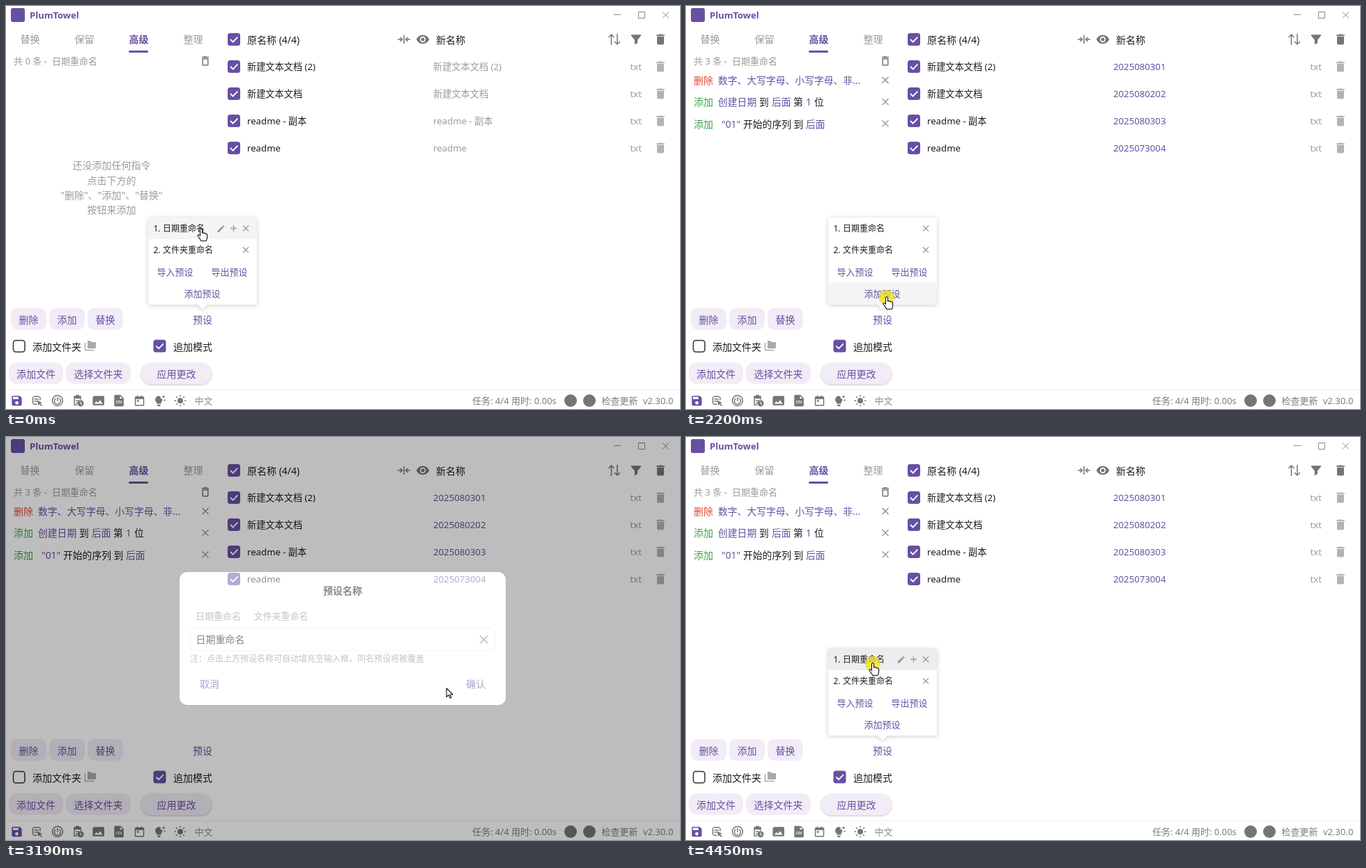
An HTML page that plays this animation: 967 by 579 pixels, repeating every 4.94 s.

```html
<!DOCTYPE html>
<html lang="zh-CN">
<head>
<meta charset="utf-8">
<title>PlumTowel</title>
<style>
html, body { margin: 0; width: 100%; height: 100%; overflow: hidden; background: #fff; }
svg { display: block; width: 967px; height: 579px; }
text { font-family: "Noto Sans", "Noto Sans CJK SC", "Noto Sans CJK", sans-serif; white-space: pre; }
#panelBox { filter: drop-shadow(0 1px 3px rgba(0,0,0,.2)); }
#apply { filter: drop-shadow(0 1px 1px rgba(0,0,0,.22)); }
</style>
</head>
<body>
<svg id="stage" viewBox="0 0 967 579"></svg>
<script>
const LOOP = 4940;
const PURPLE = '#6750a4', GRAY = '#9b9b9b', DARK = '#1d1b20', ICON = '#757575';

// Markup helpers; y is the optical centre of the text line.
const text = (x, y, size, fill, str, extra = '') =>
  `<text x="${x}" y="${(y + size * .37).toFixed(2)}" font-size="${size}" fill="${fill}" ${extra}>${str}</text>`;
const mid = 'text-anchor="middle"';
const rect = (x, y, w, h, r, fill, extra = '') =>
  `<rect x="${x}" y="${y}" width="${w}" height="${h}" rx="${r}" fill="${fill}" ${extra}/>`;
const line = (d, color, w = 1.2) =>
  `<path d="${d}" fill="none" stroke="${color}" stroke-width="${w}"/>`;
const icon = (x, y, size, d, fill = ICON) =>
  `<path transform="translate(${x - size / 2} ${y - size / 2}) scale(${size / 24})" d="${d}" fill="${fill}" fill-rule="evenodd"/>`;
const cross = (x, y, r, color = '#858585', w = 1.1) =>
  line(`M${x - r} ${y - r}l${2 * r} ${2 * r}m0 ${-2 * r}l${-2 * r} ${2 * r}`, color, w);
const check = (x, y) =>
  rect(x - 9, y - 9, 18, 18, 3.5, PURPLE) + line(`M${x - 5} ${y}l3.6 3.6 6.8-7`, '#fff', 1.8);
const group = (id, body) => `<g id="${id}">${body}</g>`;
const button = (x, y, w, r, str, id = '') =>
  rect(x, y, w, 31, r, '#f2ecf6', id && `id="${id}"`) + text(x + w / 2, y + 16.5, 14, PURPLE, str, mid);

const BIN = 'M6 19a2 2 0 0 0 2 2h8a2 2 0 0 0 2-2V7H6zM19 4h-3.5l-1-1h-5l-1 1H5v2h14z';
const EYE = 'M12 4.5C7 4.5 2.7 7.6 1 12c1.7 4.4 6 7.5 11 7.5s9.3-3.1 11-7.5c-1.7-4.4-6-7.5-11-7.5zM12 17a5 5 0 1 1 0-10 5 5 0 0 1 0 10zm0-8a3 3 0 1 0 0 6 3 3 0 0 0 0-6z';
const SAVE = 'M17 3H5a2 2 0 0 0-2 2v14a2 2 0 0 0 2 2h14a2 2 0 0 0 2-2V7zM12 19a3 3 0 1 1 0-6 3 3 0 0 1 0 6zM15 9H5V5h10z';
const LIST = 'M3 3h16v2H3zM3 3h2v17H3zM17 3h2v8h-2zM7 8h8v2H7zM7 12h5v2H7zM3 18h9v2H3zM12 11l10 5-4 1 4 4-1.5 1.5-4-4-1.5 3.5z';
const POWER = 'M12 1a11 11 0 1 0 0 22 11 11 0 0 0 0-22zM12 3a9 9 0 1 1 0 18 9 9 0 0 1 0-18zM11 5h2v8h-2zM8 7l1.3 1.5a5 5 0 1 0 5.4 0L16 7a7 7 0 1 1-8 0z';
const CLIP = 'M4 3h4V1h6v2h4v7h-2V8H6v11h5v2H4zM8 11h6v2H8zM8 15h3v2H8zM17 11a6 6 0 1 0 0 12 6 6 0 0 0 0-12zM16.3 13.5h1.4v3.3l2.3 1.5-.8 1.2-2.9-2z';
const IMAGE = 'M4 3h17a2 2 0 0 1 2 2v14a2 2 0 0 1-2 2H3a2 2 0 0 1-2-2V5zM4 18h16l-5-7-4 5-3-3z';
const FILE = 'M6 1h9l6 6v14a2 2 0 0 1-2 2H5a2 2 0 0 1-2-2V3a2 2 0 0 1 3-2zM14 3v5h5z';
const CAL = 'M5 4h2V2h2v2h6V2h2v2h2a2 2 0 0 1 2 2v14a2 2 0 0 1-2 2H5a2 2 0 0 1-2-2V6a2 2 0 0 1 2-2zM5 9v11h14V9zM7 11h4v3H7z';
const BULB = 'M10 3a7 7 0 0 0-4 12.700V18h8v-2.300A7 7 0 0 0 16 8h-3V4zM7 19.500h6V21a1.500 1.500 0 0 1-1.500 1.500h-3A1.500 1.500 0 0 1 7 21zM19 1l1 2.500 2.500 1-2.500 1-1 2.500-1-2.500-2.500-1 2.500-1zM21 9l.7 1.500 1.500.7-1.500.7-.7 1.500-.7-1.500-1.500-.7 1.500-.7z';
const PENCIL = 'M3 17.200V21h3.800L18 9.900 14.100 6zM20.700 7a1 1 0 0 0 0-1.400l-2.300-2.300a1 1 0 0 0-1.400 0L15.100 5.100 18.900 8.900z';

const files = ['新建文本文档 (2)', '新建文本文档', 'readme - 副本', 'readme'];
const dates = ['2025080301', '2025080202', '2025080303', '2025073004'];
const rowY = i => 87 + 39 * i;
const names = (id, list, color) =>
  group(id, list.map((s, i) => text(613, rowY(i), 13.2, color, s)).join(''));

function titleBar() {
  return rect(7, 3, 20, 20, 3, PURPLE) +
    text(34, 13, 13, PURPLE, 'PlumTowel', 'font-weight="700"') +
    line('M872 12.500h10M907.500 8.500h9v9h-9z', '#8a8a8a', 1) + cross(946.5, 13, 4.5, '#8a8a8a', 1);
}

function tabs() {
  return ['替换', '保留', '高级', '整理'].map((s, i) =>
    text(20.5 + 78 * i, 47.5, 14, i == 2 ? PURPLE : GRAY, s, i == 2 ? 'font-weight="700"' : '')).join('') +
    rect(176, 64, 28, 3, 1.5, PURPLE) +
    text(11, 79, 13, GRAY, '', 'id="count"') + text(66, 79, 13, GRAY, '日期重命名') +
    icon(286, 79, 18, BIN + 'M8 9h8v10H8z');
}

function emptyHint() {
  return group('empty', ['还没添加任何指令', '点击下方的', '"删除"、"添加"、"替换"', '按钮来添加']
    .map((s, i) => text(151.5, 229 + 21.4 * i, 14, GRAY, s, mid)).join(''));
}

function rules() {
  // Each part: x, text, optional dark flag.
  const parts = [
    [[46, '数字、大写字母、小写字母、非...']],
    [[46, '创建日期'], [105, '到', 1], [123, '后面'], [154, '第', 1], [172, '1'], [184, '位', 1]],
    [[51, '"01"'], [82, '开始的序列', 1], [154.500, '到', 1], [172, '后面']],
    [[47, '" - New！！！ "'], [147, '到', 1], [165, '后面'], [196, '第', 1], [214, '1'], [226, '位', 1]]
  ];
  return parts.map((row, i) => {
    const y = 107 + 31.2 * i;
    return group('rule' + i,
      text(11, y, 14, i ? '#3fa34d' : '#e5483b', i ? '添加' : '删除') +
      row.map(([x, s, dark]) => text(x, y, 13.8, dark ? DARK : PURPLE, s)).join('') +
      cross(286, y - .5, 4.5));
  }).join('');
}

function fileList() {
  let s = check(327, 48) + text(346, 48.5, 14, DARK, '原名称 (4/4)') + text(617, 48.5, 14, DARK, '新名称') +
    line('M562 48h6m-2.500-3l3 3-3 3M580 48h-6m2.500-3l-3 3 3 3M571 42v12', ICON, 1.5) +
    icon(598, 48, 20, EYE) +
    line('M868.500 56V41m-4 4l4-4 4 4M877 40v15m-4-4l4 4 4-4', ICON, 1.5) +
    icon(904, 48, 20, 'M3.500 4h17v1.500L14.500 13v5l-5 3v-8l-6-7.500z') + icon(939, 48, 20, BIN);
  files.forEach((f, i) => {
    const y = rowY(i);
    s += check(327, y) + text(346, y, 13.2, DARK, f) +
      text(895.5, y + .5, 13.2, GRAY, 'txt') + icon(939, y, 20, BIN, '#b3b3b3');
  });
  return s + names('plain', files, GRAY) + names('dated', dates, PURPLE) +
    names('suffixed', dates.map(d => d + ' - New！！！'), PURPLE);
}

function controls() {
  return button(7, 434, 51, 9, '删除') + button(62, 434, 51, 9, '添加') + button(117, 434, 51, 9, '替换') +
    text(268, 451, 14, PURPLE, '预设') +
    rect(10.5, 480.5, 16.5, 16.5, 3.5, 'none', 'stroke="#333" stroke-width="1.500"') +
    text(38, 490, 14, DARK, '添加文件夹') +
    `<path d="M117 481h4.500l1.500 2h6v9h-12z" fill="#aaa"/>` + line('M113.500 484v10.500h13', '#aaa', 1.5) +
    check(220.5, 488.5) + text(240, 490, 14, DARK, '追加模式') +
    button(4, 512, 78, 12, '添加文件') + button(86, 512, 93, 12, '选择文件夹') + button(193.5, 512.5, 102, 15.5, '应用更改', 'apply');
}

function footer() {
  let rays = '';
  for (let i = 0; i < 8; i++) {
    const c = Math.cos(i * Math.PI / 4), s = Math.sin(i * Math.PI / 4);
    rays += `M${250 + 6 * c} ${567 + 6 * s}L${250 + 8.3 * c} ${567 + 8.3 * s}`;
  }
  return line('M0 551.500H967', '#eeeeee', 1) + icon(15.5, 567, 19, SAVE, PURPLE) +
    [LIST, POWER, CLIP, IMAGE, FILE, CAL, BULB].map((d, i) => icon(44.5 + 29.4 * i, 567, 18, d)).join('') +
    text(162, 569.5, 5, '#fff', 'CSV', mid + ' font-weight="700"') +
    `<circle cx="250" cy="567" r="4" fill="${ICON}"/>` + line(rays, ICON, 1.5) +
    text(270.5, 567, 13, '#8a8a8a', '中文') + text(669, 567, 13, '#7d7d7d', '任务: 4/4 用时: 0.00s') +
    `<circle cx="810" cy="567" r="9" fill="${ICON}"/><circle cx="837" cy="567" r="9" fill="${ICON}"/>` +
    text(854.5, 567, 13, '#7d7d7d', '检查更新') + text(914, 567, 13, '#7d7d7d', 'v2.30.0');
}

function panel() {
  return group('panel',
    '<path id="panelBox" d="M208 304H356a4 4 0 0 1 4 4V425a4 4 0 0 1-4 4H289l-7 7-7-7H208a4 4 0 0 1-4-4V308a4 4 0 0 1 4-4z" fill="#fff"/>' +
    rect(204, 304, 156, 31, 3, '#f4f4f4', 'id="hover"') +
    text(211.5, 319.5, 12, DARK, '1.') + text(225, 319.5, 12, DARK, '日期重命名') +
    text(211.5, 350.5, 12, DARK, '2.') + text(225, 350.5, 12, DARK, '文件夹重命名') +
    group('tools', icon(308.5, 320, 13, PENCIL, '#999') + line('M322 319.500h9m-4.500-4.500v9', '#999', 1.3)) +
    cross(344, 319.5, 4, '#999', 1.2) + cross(344, 350.5, 4, '#999', 1.2) +
    text(216.5, 382, 13, PURPLE, '导入预设') + text(294.5, 382, 13, PURPLE, '导出预设') +
    text(281.5, 413, 13, PURPLE, '添加预设', mid));
}

function dialog() {
  return group('modal', '<path d="M0 0H967V579H0z" fill="#000" opacity=".5"/>' +
    rect(249, 194, 468, 191, 11, '#fff') +
    text(483, 221, 14, DARK, '预设名称', mid + ' font-weight="700"') +
    text(272, 257.5, 13, '#8f8f8f', '日期重命名') + text(355.5, 257.5, 13, '#8f8f8f', '文件夹重命名') +
    rect(264, 274.5, 438, 32.5, 9, '#fff', 'stroke="#f1f1f1" stroke-width="1.500"') +
    group('blank', text(273, 291, 14, GRAY, '请输入预设名称') + rect(272, 280, 2, 21, 1, PURPLE)) +
    group('filled', text(272.5, 291, 14, DARK, '日期重命名') + cross(685.5, 291, 5.5, '#777', 1.3)) +
    text(264, 319, 12, '#8f8f8f', '注：点击上方预设名称可自动填充至输入框，同名预设将被覆盖') +
    rect(646, 338.5, 55, 31, 15.5, '#ebe2fb', 'id="okHover"') +
    text(278, 355, 14, PURPLE, '取消') + text(660, 355, 14, PURPLE, '确认'));
}

function pointer() {
  const style = 'fill="#fff" stroke="#111" stroke-width="1.100" stroke-linejoin="round"';
  return group('pointer', '<circle id="click" cy="1" r="11" fill="#f0e01e" opacity=".75"/>' +
    `<path id="hand" ${style} d="M-1.500 1.200Q-1.500-.3 0-.3T1.500 1.200V6Q3 5 4 6.600 5.500 5.800 6.400 7.300 8.600 6.800 8.600 9.200V12.500Q8.600 14.500 7.200 17.500H-.2Q-1 15.500-3.600 12.400-5.600 9.800-4.600 9-3.400 8.200-1.500 10.400z"/>` +
    `<path id="arrow" ${style} d="M0 0V12.500L3 9.700 5 14.200 7 13.300 5 9H9z"/>`);
}

document.getElementById('stage').innerHTML = titleBar() + tabs() + emptyHint() + rules() + fileList() +
  controls() + footer() + panel() + dialog() + pointer();
const $ = id => document.getElementById(id);
const show = (id, on) => $(id).setAttribute('visibility', on ? 'inherit' : 'hidden');
const fade = (id, a) => { $(id).setAttribute('opacity', a); show(id, a > 0); };

// Bursts of stepped motion: start, end, number of steps.
const bursts = [[420, 680, 5], [890, 1020, 3], [1230, 1490, 5], [1630, 2140, 8], [2200, 2660, 8],
  [2730, 3190, 8], [3260, 3720, 8], [3790, 4260, 8], [4330, 4450, 3]];
// Pointer path: time, x, y, hand shape.
const path = [[0, 280, 320, 1], [680, 280, 320, 1], [890, 280, 291, 0], [1020, 285, 196, 1], [1425, 285, 196, 1],
  [1490, 286, 240, 0], [1630, 286, 290, 0], [1775, 283, 446, 1], [1922, 284, 446, 1], [2068, 288, 418, 1],
  [2332, 288, 418, 1], [2528, 303, 260, 1], [2795, 303, 260, 0], [3058, 660, 360, 1], [3125, 660, 360, 1],
  [3190, 632, 361, 0], [3260, 584, 359, 0], [3457, 285, 78, 1], [3523, 285, 78, 0], [3720, 284, 400, 0],
  [3790, 283, 446, 1], [3988, 283, 446, 1], [4190, 268, 325, 1], [4940, 268, 325, 1]];
const clicks = [420, 1230, 2200, 2590, 3060, 3450, 4330];
const panelFade = [[0, 1], [890, 1], [1020, 0], [1775, 0], [1922, 1], [2200, 1], [2331, .4], [2397, 0], [3790, 0], [3988, 1], [4940, 1]];
const modalFade = [[0, 0], [2200, 0], [2331, 1], [3125, 1], [3260, 0], [4940, 0]];

function stepped(t) {
  let q = 0;
  for (const [a, b, n] of bursts) {
    if (t < a) break;
    const dt = (b - a) / (n - 1);
    q = a + dt * Math.min(n - 1, Math.floor((t - a + 12) / dt));
  }
  return q;
}

function sample(keys, t, col) {
  let i = 0;
  while (i < keys.length - 2 && keys[i + 1][0] <= t) i++;
  const a = keys[i], b = keys[i + 1];
  return a[col] + (b[col] - a[col]) * (t - a[0]) / (b[0] - a[0]);
}

function render(time) {
  const t = stepped(time % LOOP);
  const x = sample(path, t, 1), y = sample(path, t, 2);
  const hand = path.filter(k => k[0] <= t).pop()[3];

  const cleared = t < 485 || (t > 3520 && t < 4389);
  const suffixed = !cleared && t < 1630;
  const count = cleared ? 0 : suffixed && t < 1359 ? 4 : 3;
  for (let i = 0; i < 4; i++) show('rule' + i, i < count);
  $('count').textContent = `共 ${cleared ? 0 : suffixed ? 4 : 3} 条 - `;
  show('empty', cleared);
  show('plain', cleared);
  show('suffixed', suffixed);
  show('dated', !cleared && !suffixed);

  const row = t < 950 ? 0 : Math.floor((y - 304) / 31.2);
  const hovered = row == 0 || row == 1 || row == 3;
  fade('panel', sample(panelFade, t, 1));
  show('hover', hovered);
  show('tools', row == 0);
  $('hover').setAttribute('y', 304 + 31.2 * (hovered ? row : 0));
  $('hover').setAttribute('fill', t >= 4330 ? '#ededed' : '#f4f4f4');

  fade('modal', sample(modalFade, t, 1));
  show('blank', t < 2730);
  show('filled', t >= 2730);
  show('okHover', x > 646 && y > 338);

  $('pointer').setAttribute('transform', `translate(${x.toFixed(1)} ${y.toFixed(1)})`);
  show('hand', hand);
  show('arrow', !hand);
  show('click', clicks.some(c => t >= c && t < c + 125));
}

const start = performance.now();
function tick() {
  render(performance.now() - start);
  requestAnimationFrame(tick);
}
tick();
</script>
</body>
</html>
```
